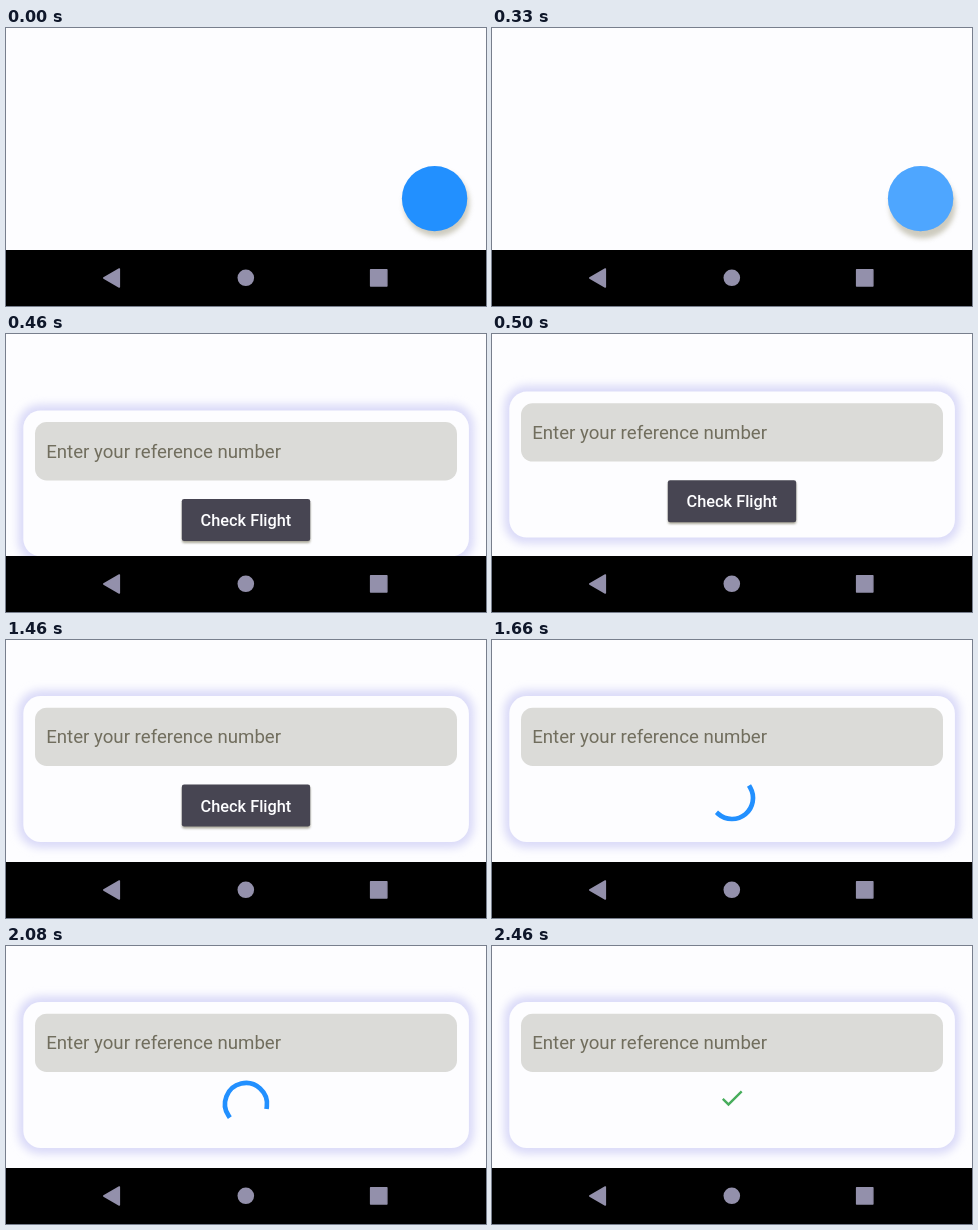
An HTML page that plays this animation: 480x278 px, repeating every 2960 ms.

```html
<!DOCTYPE html>
<html lang="en">
<head>
<meta charset="utf-8">
<title>Check flight sheet</title>
<style>
  html, body { margin: 0; width: 100%; height: 100%; overflow: hidden; background: #fdfdff; }
  svg { display: block; width: 100vw; height: 100vh; }
  text { font-family: Roboto, "Open Sans", sans-serif; }
</style>
</head>
<body>
<svg viewBox="0 0 480 278">
  <defs>
    <filter id="cardBlur" filterUnits="userSpaceOnUse" x="-10" y="20" width="500" height="220">
      <feGaussianBlur stdDeviation="4.2"/>
    </filter>
    <filter id="fabBlur" filterUnits="userSpaceOnUse" x="370" y="110" width="110" height="130">
      <feGaussianBlur stdDeviation="2.6"/>
    </filter>
    <filter id="buttonBlur" filterUnits="userSpaceOnUse" x="160" y="130" width="160" height="74">
      <feGaussianBlur stdDeviation="1.1"/>
    </filter>
    <clipPath id="fabClip"><circle cx="428.6" cy="170.6" r="32.7"/></clipPath>
  </defs>

  <rect width="480" height="278" fill="#fdfdff"/>

  <g id="fab">
    <circle id="fabShadow" cx="430.6" cy="175.6" r="33" fill="#b4b09c" opacity=".65" filter="url(#fabBlur)"/>
    <circle cx="428.6" cy="170.6" r="32.7" fill="#2290ff"/>
    <circle id="ripple" cx="428.6" cy="170.6" fill="#fff" opacity=".2" clip-path="url(#fabClip)"/>
  </g>

  <g id="card">
    <rect x="12" y="50" width="456" height="158" rx="22" fill="#dadaf8" filter="url(#cardBlur)"/>
    <rect x="17.3" y="56" width="445.6" height="146" rx="17.5" fill="#fdfdff"/>
    <rect x="29" y="67.7" width="422" height="58.3" rx="11.7" fill="#dbdbd8"/>
    <text x="40.2" y="103.2" font-size="18.67" fill="#716e5e">Enter your reference number</text>

    <g id="button">
      <rect x="176" y="146.5" width="128.3" height="42" rx="2.5" fill="#8f8c78" opacity=".75" filter="url(#buttonBlur)"/>
      <rect x="175.8" y="144.6" width="128.4" height="42" rx="2.3" fill="#474552"/>
      <text x="239.9" y="171.5" font-size="16.33" font-weight="500" text-anchor="middle" fill="#fdfdff">Check Flight</text>
    </g>
    <path id="spinner" fill="none" stroke="#2290ff" stroke-width="4.67" stroke-linecap="square"/>
    <path id="check" transform="translate(226 138) scale(1.167)" fill="#47ad5c"
      d="M9 16.17L4.83 12l-1.42 1.41L9 19 21 7l-1.41-1.41z"/>
  </g>

  <rect y="222" width="480" height="56" fill="#000"/>
  <g fill="#9390ab" stroke="#9390ab" stroke-linejoin="round">
    <path d="M97.8 250L113.3 241V259Z" stroke-width="1.6"/>
    <circle cx="239.8" cy="249.8" r="8.3" stroke="none"/>
    <rect x="364.6" y="241.7" width="16.3" height="16.3" stroke-width="1.4"/>
  </g>
</svg>

<script>
  const LOOP = 2960, FPS = 24;
  const PRESS = 5, FAB_GONE = 9, SETTLED = 35, DONE = 59;
  const SLIDE_START = 363, SLIDE_MS = 157, TRAVEL = 172, HELD_GAP = 1.4;
  const SPIN_START = 35.3;

  const $ = id => document.getElementById(id);
  const [fab, fabShadow, ripple, card, button, spinner, check] =
    ["fab", "fabShadow", "ripple", "card", "button", "spinner", "check"].map($);

  const clamp = v => Math.min(1, Math.max(0, v));
  const show = (el, on) => el.setAttribute("visibility", on ? "inherit" : "hidden");

  // cubic-bezier(.4, 0, .2, 1)
  function ease(x) {
    if (x <= 0 || x >= 1) return clamp(x);
    let lo = 0, hi = 1;
    for (let i = 0; i < 24; i++) {
      const s = (lo + hi) / 2, r = 1 - s;
      if (1.2 * r * r * s + 0.6 * r * s * s + s * s * s < x) lo = s; else hi = s;
    }
    return lo * lo * (3 - 2 * lo);
  }

  function arc(cx, cy, r, start, sweep) {
    const at = a => `${(cx + r * Math.cos(a)).toFixed(2)} ${(cy + r * Math.sin(a)).toFixed(2)}`;
    return `M${at(start)}A${r} ${r} 0 ${sweep > Math.PI ? 1 : 0} 1 ${at(start + sweep)}`;
  }

  // Head grows in the first half of a turn, tail catches up in the second.
  function drawSpinner(u) {
    const head = ease(u * 2), tail = ease(u * 2 - 1);
    const start = Math.PI * (-0.5 + 1.5 * tail + 1.7 * u);
    const sweep = Math.max(0.001, 1.5 * Math.PI * (head - tail));
    spinner.setAttribute("d", arc(240, 158, 21, start, sweep));
  }

  function cardOffset(step) {
    if (step >= SETTLED) return 0;
    const p = ease((step * 1000 / FPS - SLIDE_START) / SLIDE_MS);
    return Math.max(HELD_GAP, TRAVEL * (1 - p));
  }

  function render(t) {
    const step = Math.floor((t + 7) * FPS / 1000);

    const press = clamp((step - PRESS + 1) / (FAB_GONE - PRESS));
    show(fab, step < FAB_GONE);
    ripple.setAttribute("r", 33 * press);
    fabShadow.setAttribute("cy", 175.6 + 2 * press);

    show(card, step >= FAB_GONE);
    card.setAttribute("transform", `translate(0 ${cardOffset(step).toFixed(2)})`);

    show(button, step <= SETTLED);
    show(spinner, step > SETTLED && step < DONE);
    show(check, step >= DONE);
    drawSpinner(clamp((step - SPIN_START) / FPS));
  }

  const origin = performance.now();
  function tick() {
    render((performance.now() - origin) % LOOP);
    requestAnimationFrame(tick);
  }
  tick();
</script>
</body>
</html>
```
